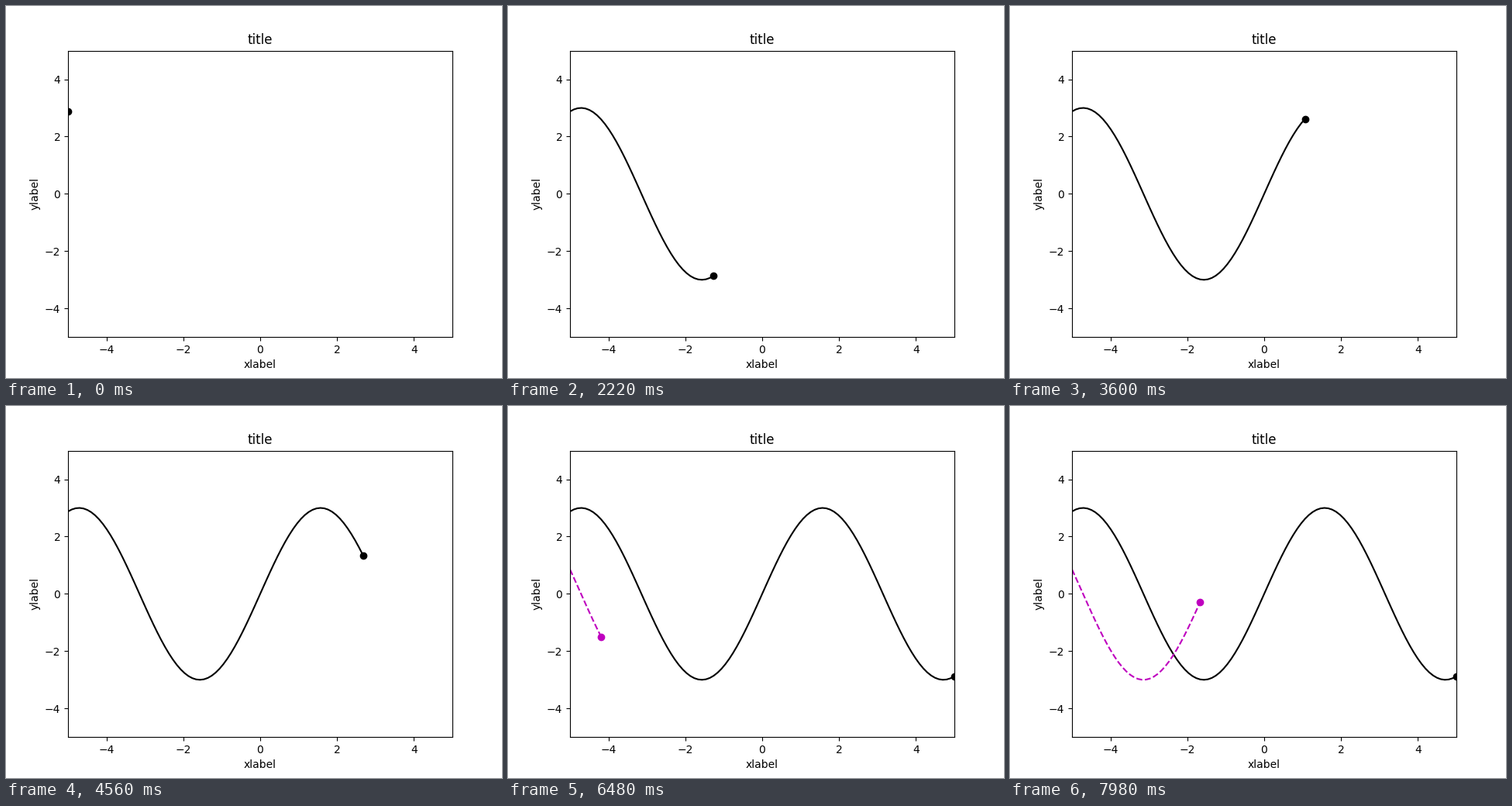
These frames come from a looping animation (640 px wide and 480 px high, 8 s). A matplotlib script:

```python
import numpy as np
import matplotlib.pyplot as plt
from matplotlib.animation import FuncAnimation

TICK = 20            # ms per animation frame
TICKS_PER_STEP = 3   # the curve grows by one point every 60 ms
LOOP = 8000

x = np.linspace(-5, 5, 100)

fig, ax = plt.subplots(figsize=(6.4, 4.8), dpi=100)
ax.set(xlim=(-5, 5), ylim=(-5, 5),
       title="title", xlabel="xlabel", ylabel="ylabel")


def make_curve(y, color, style, start):
    line, = ax.plot([], [], color + style)
    dot, = ax.plot([], [], color + "o")
    return y, line, dot, start


# the second curve starts once the first is complete
curves = [
    make_curve(3 * np.sin(x), "k", "-", 0),
    make_curve(3 * np.cos(x), "m", "--", len(x)),
]


def update(frame):
    step = frame // TICKS_PER_STEP
    artists = []
    for y, line, dot, start in curves:
        n = int(np.clip(step - start + 1, 0, len(x)))
        line.set_data(x[:n], y[:n])
        dot.set_data(x[:n][-1:], y[:n][-1:])
        artists += [line, dot]
    return artists


anim = FuncAnimation(fig, update, frames=LOOP // TICK, interval=TICK,
                     init_func=lambda: update(0), repeat=True,
                     repeat_delay=0, blit=True)
plt.show()
```
